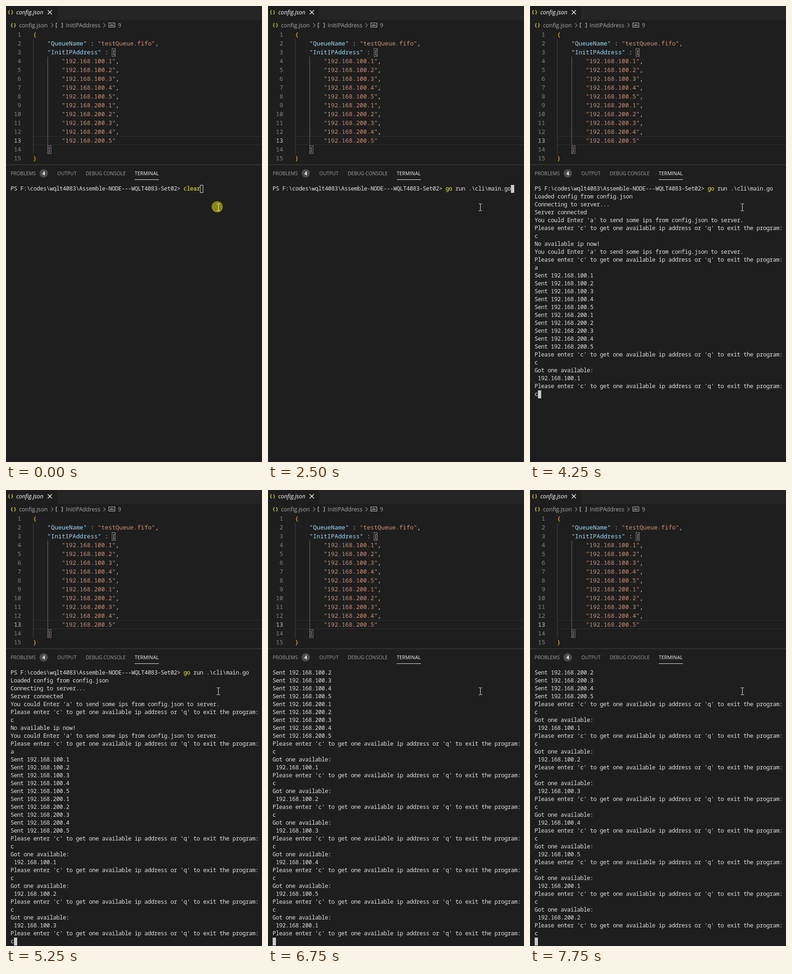
Animation, 549 px wide and 981 px high, one loop 8000 ms. Source, as an HTML page with a canvas:

```html
<!DOCTYPE html>
<html lang="en">
<head>
<meta charset="utf-8">
<title>Terminal session</title>
<style>
  html, body { margin: 0; width: 100%; height: 100%; overflow: hidden; background: #1e1e1e; }
  canvas { display: block; width: 100%; height: 100%; }
</style>
</head>
<body>
<canvas id="stage" width="549" height="981"></canvas>
<script>
const ctx = document.getElementById('stage').getContext('2d');
const W = 549, H = 981, LOOP = 8000;
const MONO = '"Noto Sans Mono", "DejaVu Sans Mono", monospace';
const SANS = '"Open Sans", "Noto Sans", sans-serif';
const OUTPUT = '#e0e0e0';

// Editor and terminal character grids
const ED = { x: 58, y: 52, cw: 7.7, lh: 19, base: 14, font: `500 12.83px ${MONO}` };
const TERM = { x: 10, y: 385, cw: 7, lh: 17, base: 12, rows: 35, font: `500 12.4px ${MONO}` };

const PROMPT = 'PS F:\\codes\\wqlt4083\\Assemble-NODE---WQLT4083-Set02> ';
const COMMAND = 'go run .\\cli\\main.go';
const IPS = [100, 200].flatMap(net => [1, 2, 3, 4, 5].map(n => `192.168.${net}.${n}`));
const HINT_A = "You could Enter 'a' to send some ips from config.json to server.";
const HINT_C = "Please enter 'c' to get one available ip address or 'q' to exit the program:";

const LOG = [
  PROMPT, 'Loaded config from config.json', 'Connecting to server...', 'Server connected',
  HINT_A, HINT_C, 'c', 'No available ip now!', HINT_A, HINT_C, 'a',
  ...IPS.map(ip => 'Sent ' + ip), HINT_C,
  ...IPS.flatMap(ip => ['c', 'Got one available:', ' ' + ip, HINT_C])
];

// [start ms, cursor line, answer already typed on that line]
const RUN = [
  [2750, 1, 0], [3000, 3, 0], [3250, 6, 1], [3500, 11, 0],
  [3750, 22, 1], [4000, 26, 0], [4250, 26, 1],
  [4750, 30, 1], [5000, 34, 0], [5250, 34, 1], [5750, 38, 1], [6250, 42, 1],
  [6750, 46, 0], [7000, 46, 1], [7250, 50, 0], [7500, 50, 1], [7750, 51, 0]
];

function rect(x, y, w, h, color) {
  ctx.fillStyle = color;
  ctx.fillRect(x, y, w, h);
}

function box(x, y, w, h, color) {
  ctx.strokeStyle = color;
  ctx.lineWidth = 1;
  ctx.strokeRect(x + .5, y + .5, w - 1, h - 1);
}

function disc(x, y, r, color) {
  ctx.fillStyle = color;
  ctx.beginPath();
  ctx.arc(x, y, r, 0, Math.PI * 2);
  ctx.fill();
}

function path(color, width, ...points) {
  ctx.strokeStyle = color;
  ctx.lineWidth = width;
  ctx.beginPath();
  points.forEach(([x, y], i) => i ? ctx.lineTo(x, y) : ctx.moveTo(x, y));
  ctx.stroke();
}

function label(str, x, y, font, color, align = 'left') {
  ctx.font = font;
  ctx.fillStyle = color;
  ctx.textAlign = align;
  ctx.fillText(str, x, y);
}

// Writes text into grid cells, each glyph centred in its cell
function put(grid, str, col, row, color) {
  const y = grid.y + row * grid.lh + grid.base;
  [...str].forEach((ch, i) => {
    if (ch !== ' ') label(ch, grid.x + (col + i + .5) * grid.cw, y, grid.font, color, 'center');
  });
}

function braces(x, y) {
  const font = `bold 11px ${MONO}`;
  label('{', x - 1, y, font, '#cbcb41');
  label('}', x + 6, y, font, '#cbcb41');
}

function chevron(x) {
  path('#a0a0a0', 1.1, [x - 2, 37], [x + 2, 41.5], [x - 2, 46]);
}

function drawHeader() {
  rect(110, 0, W - 110, 30, '#252526');
  braces(4, 17);
  label('config.json', 22, 18, `italic 12.25px ${SANS}`, '#ffffff');
  path('#ffffff', 1.2, [89.5, 9], [98.5, 18]);
  path('#ffffff', 1.2, [98.5, 9], [89.5, 18]);

  const font = `12.2px ${SANS}`, gray = '#a9a9a9';
  braces(10, 45);
  label('config.json', 28, 46, font, gray);
  chevron(99);
  path('#c5c5c5', 1.2, [110, 37], [107.5, 37], [107.5, 46], [110, 46]);
  path('#c5c5c5', 1.2, [118.5, 37], [121, 37], [121, 46], [118.5, 46]);
  label('InitIPAddress', 128, 46, font, gray);
  chevron(211);
  box(220, 36, 14, 10, '#c5c5c5');
  label('abc', 227, 43, `bold 5.5px ${SANS}`, '#c5c5c5', 'center');
  label('9', 240, 46, font, gray);
}

function drawEditor() {
  const key = '#9cdcfe', text = '#ce9178', plain = '#d4d4d4', gold = '#fbc93d';
  rect(58, 280, W - 58, 1, '#303030');
  rect(58, 298, W - 58, 1, '#303030');
  rect(58, 71, 1, 247, '#404040');
  rect(89, 109, 1, 190, '#707070');
  for (let n = 1; n <= 15; n++) {
    label(n, 32.5, ED.y + (n - 1) * ED.lh + ED.base, ED.font, n === 13 ? '#c6c6c6' : '#858585', 'right');
  }
  put(ED, '{', 0, 0, gold);
  put(ED, '"QueueName"', 4, 1, key);
  put(ED, ':', 16, 1, plain);
  put(ED, '"testQueue.fifo"', 18, 1, text);
  put(ED, ',', 34, 1, plain);
  put(ED, '"InitIPAddress"', 4, 2, key);
  put(ED, ':', 20, 2, plain);
  box(227, 91, 8, 18, '#888888');
  put(ED, '[', 22, 2, '#d8b49c');
  IPS.forEach((ip, i) => {
    put(ED, `"${ip}"`, 8, 3 + i, text);
    if (i < IPS.length - 1) put(ED, ',', 10 + ip.length, 3 + i, plain);
  });
  box(89, 300, 8, 18, '#888888');
  put(ED, ']', 4, 13, '#f07cec');
  put(ED, '}', 0, 14, gold);
}

function drawPanelTabs() {
  const font = `10.45px ${SANS}`, gray = '#a0a0a0';
  rect(0, 341, W, 1, '#414141');
  label('PROBLEMS', 10, 364, font, gray);
  disc(81, 360, 9, '#4d4d4d');
  label('4', 81, 364, `bold 10.5px ${SANS}`, '#ffffff', 'center');
  label('OUTPUT', 110, 364, font, gray);
  label('DEBUG CONSOLE', 171, 364, font, gray);
  label('TERMINAL', 276, 364, `10.7px ${SANS}`, '#f0f0f0');
  rect(276, 373, 52, 1, '#e7e7e7');
}

function cursor(col, row, hollow) {
  const x = TERM.x + col * TERM.cw, y = TERM.y + row * TERM.lh;
  if (hollow) box(x, y, TERM.cw, TERM.lh, '#e0e0e0');
  else rect(x, y, TERM.cw, TERM.lh, '#cccccc');
}

function drawPrompt(row, input) {
  const name = input.split(' ')[0], col = PROMPT.length;
  put(TERM, PROMPT, 0, row, OUTPUT);
  put(TERM, name, col, row, '#f5f543');
  put(TERM, input.slice(name.length), col + name.length, row, OUTPUT);
}

function drawInput(t) {
  if (t >= 1000 && t < 1250) return cursor(0, 0);
  const typed = Math.max(0, Math.floor((t - 1250) / 250)) * 4;
  const input = t < 1000 ? 'clear' : COMMAND.slice(0, typed);
  drawPrompt(0, input);
  if (t < 750 || t >= 1000) cursor(PROMPT.length + input.length, 0, t < 250);
}

function drawRun(t) {
  const [, line, typed] = RUN.findLast(step => t >= step[0]);
  const top = Math.max(0, line - TERM.rows + 1);
  for (let i = top; i < line + typed; i++) {
    if (i === 0) drawPrompt(0, COMMAND);
    else put(TERM, LOG[i], 0, i - top, OUTPUT);
  }
  cursor(typed, line - top);
}

function drawPointer(t) {
  if (t < 500) disc(453, 432, 12, '#8b8612');
  const color = '#f0f0f0';
  rect(455, 426, 1, 14, color);
  for (const y of [425, 440]) {
    rect(452, y, 3, 1, color);
    rect(456, y, 3, 1, color);
  }
}

function frame() {
  const t = performance.now() % LOOP;
  rect(0, 0, W, H, '#1e1e1e');
  drawHeader();
  drawEditor();
  drawPanelTabs();
  if (t < RUN[0][0]) drawInput(t);
  else drawRun(t);
  drawPointer(t);
  requestAnimationFrame(frame);
}
requestAnimationFrame(frame);
</script>
</body>
</html>
```
